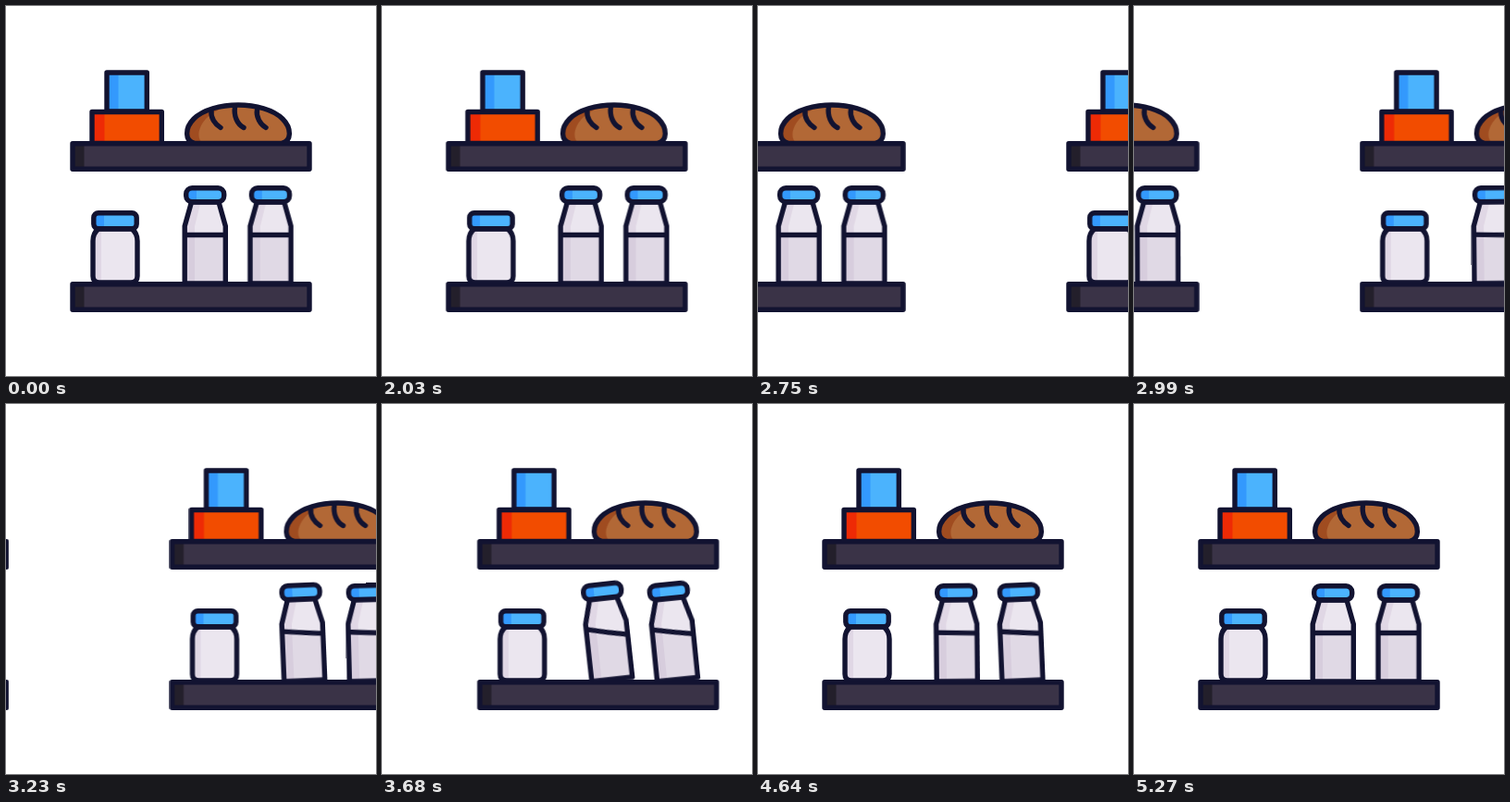
These frames come from a looping animation (400 by 400 pixels, 5360 ms). An HTML page:

```html
<!DOCTYPE html>
<html lang="en">
<head>
<meta charset="utf-8">
<title>Shelves</title>
<style>
html, body { margin: 0; width: 100%; height: 100%; overflow: hidden; background: #fff; }
svg { display: block; width: 100vw; height: 100vh; }
.line { fill: none; stroke: #121331; stroke-width: 5.4; stroke-linejoin: round; stroke-linecap: round; }
.glass { fill: #ebe6ef; }
.milk { fill: #e0d9e5; }
.shade { fill: #b59fc0; opacity: .22; }
.blue { fill: #4bb3fd; }
.deep { fill: #3399fd; }

#track { animation: slide 5.36s infinite; }
.tilt { transform-origin: 193px 300px; }
.first .tilt { animation: lean1 5.36s infinite cubic-bezier(.333, 0, .667, 1); }
.second .tilt { animation: lean2 5.36s infinite cubic-bezier(.333, 0, .667, 1); }
.first .level { animation: slosh1 5.36s infinite cubic-bezier(.333, 0, .667, 1); }
.second .level { animation: slosh2 5.36s infinite cubic-bezier(.333, 0, .667, 1); }

@keyframes slide {
  0%, 37.313% { transform: translateX(0); animation-timing-function: cubic-bezier(.333, 0, .3, 1); }
  82.09%, 100% { transform: translateX(-435px); }
}
@keyframes lean1 {
  0%, 52.239% { transform: rotate(0deg); }
  72.761% { transform: rotate(-7deg); }
  89.552%, 100% { transform: rotate(0deg); }
}
@keyframes lean2 {
  0%, 54.104% { transform: rotate(0deg); }
  76.493% { transform: rotate(-8deg); }
  92.351%, 100% { transform: rotate(0deg); }
}
@keyframes slosh1 {
  0%, 52.239% { d: path("M-40 0 Q0 0 40 0 V80 H-40 Z"); }
  72.761% { d: path("M-40 -10.5 Q0 3 40 10.5 V80 H-40 Z"); }
  89.552%, 100% { d: path("M-40 0 Q0 0 40 0 V80 H-40 Z"); }
}
@keyframes slosh2 {
  0%, 54.104% { d: path("M-40 0 Q0 0 40 0 V80 H-40 Z"); }
  76.493% { d: path("M-40 -11 Q0 3 40 11 V80 H-40 Z"); }
  92.351%, 100% { d: path("M-40 0 Q0 0 40 0 V80 H-40 Z"); }
}
</style>
</head>
<body>
<svg viewBox="0 0 400 400">
  <defs>
    <clipPath id="loafClip"><path d="M204 148.5C193 146 193 132 203 122C213 112 232 107 251 107C270 107 289 112 299 122C309 132 309 146 298 148.5Z"/></clipPath>
    <clipPath id="jarClip"><path d="M100 241C96 244 94 249 94 254V292Q94 299 101 299H135Q142 299 142 292V254C142 249 140 244 136 241Z"/></clipPath>
    <clipPath id="bottleClip"><path d="M200.5 212L193.2 238V300H237.3V238L230 212Z"/></clipPath>
    <clipPath id="capClip"><rect x="194.7" y="196.7" width="41" height="15" rx="6.5"/></clipPath>
    <clipPath id="lidClip"><rect x="94.8" y="223.8" width="46.4" height="17" rx="5"/></clipPath>
  </defs>
  <g id="track">
    <g id="scene">
      <!-- boxes -->
      <rect class="blue" x="109" y="72" width="43.3" height="42"/>
      <rect class="deep" x="109" y="72" width="12.5" height="42"/>
      <rect class="line" x="109" y="72" width="43.3" height="42"/>
      <rect fill="#f24c00" x="93" y="114.5" width="75.3" height="34"/>
      <rect fill="#ee2a05" x="93" y="114.5" width="13.5" height="34"/>
      <rect class="line" x="93" y="114.5" width="75.3" height="34"/>

      <!-- bread -->
      <g clip-path="url(#loafClip)">
        <rect x="190" y="100" width="125" height="50" fill="#a04c20"/>
        <path fill="#b26836" d="M213 148.5C206 144 207 132 216 122C226 112 239 107 256 106H315V150H213Z"/>
      </g>
      <path class="line" d="M204 148.5C193 146 193 132 203 122C213 112 232 107 251 107C270 107 289 112 299 122C309 132 309 146 298 148.5Z"/>
      <path class="line" d="M222 113C221 121 226 128 232 131.5M247.5 109C246 119 250 128 257 131.5M271.5 112C270 120 275 128 281 131.5"/>

      <!-- jar -->
      <g clip-path="url(#jarClip)">
        <rect class="glass" x="90" y="240" width="56" height="62"/>
        <rect class="shade" x="90" y="240" width="13" height="62"/>
      </g>
      <path class="line" d="M100 241C96 244 94 249 94 254V292Q94 299 101 299H135Q142 299 142 292V254C142 249 140 244 136 241Z"/>
      <g clip-path="url(#lidClip)">
        <rect class="blue" x="92" y="222" width="52" height="20"/>
        <rect class="deep" x="92" y="222" width="14" height="20"/>
      </g>
      <rect class="line" x="94.8" y="223.8" width="46.4" height="17" rx="5"/>

      <!-- bottle -->
      <g class="first">
        <g class="tilt">
          <g clip-path="url(#bottleClip)">
            <rect class="glass" x="190" y="210" width="50" height="92"/>
            <g transform="translate(215.2 247.5)">
              <path class="milk level" d="M-40 0Q0 0 40 0V80H-40Z"/>
            </g>
            <path class="shade" d="M190 302V238L200 210H211L204 238V302Z"/>
            <g transform="translate(215.2 247.5)">
              <path class="line level" d="M-40 0Q0 0 40 0V80H-40Z"/>
            </g>
          </g>
          <path class="line" d="M200.5 212L193.2 238V300H237.3V238L230 212Z"/>
          <g clip-path="url(#capClip)">
            <rect class="blue" x="192" y="195" width="46" height="18"/>
            <rect class="deep" x="192" y="195" width="14" height="18"/>
          </g>
          <rect class="line" x="194.7" y="196.7" width="41" height="15" rx="6.5"/>
        </g>
      </g>

      <!-- shelves -->
      <g id="shelf">
        <rect fill="#3a3347" x="72" y="148.7" width="256" height="27.6"/>
        <rect fill="#231f2b" x="72" y="148.7" width="12.5" height="27.6"/>
        <rect class="line" x="72" y="148.7" width="256" height="27.6"/>
      </g>
      <use href="#shelf" y="152"/>
    </g>
  </g>
</svg>
<script>
const scene = document.getElementById("scene");
const bottle = scene.querySelector(".first");

// second bottle, leaning a little later
const twin = bottle.cloneNode(true);
twin.setAttribute("class", "second");
twin.setAttribute("transform", "translate(70.7 0)");
bottle.after(twin);

// the next set of shelves, waiting off to the right
const next = scene.cloneNode(true);
next.removeAttribute("id");
next.querySelector("#shelf").removeAttribute("id");
next.setAttribute("transform", "translate(435 0)");
scene.after(next);
</script>
</body>
</html>
```
